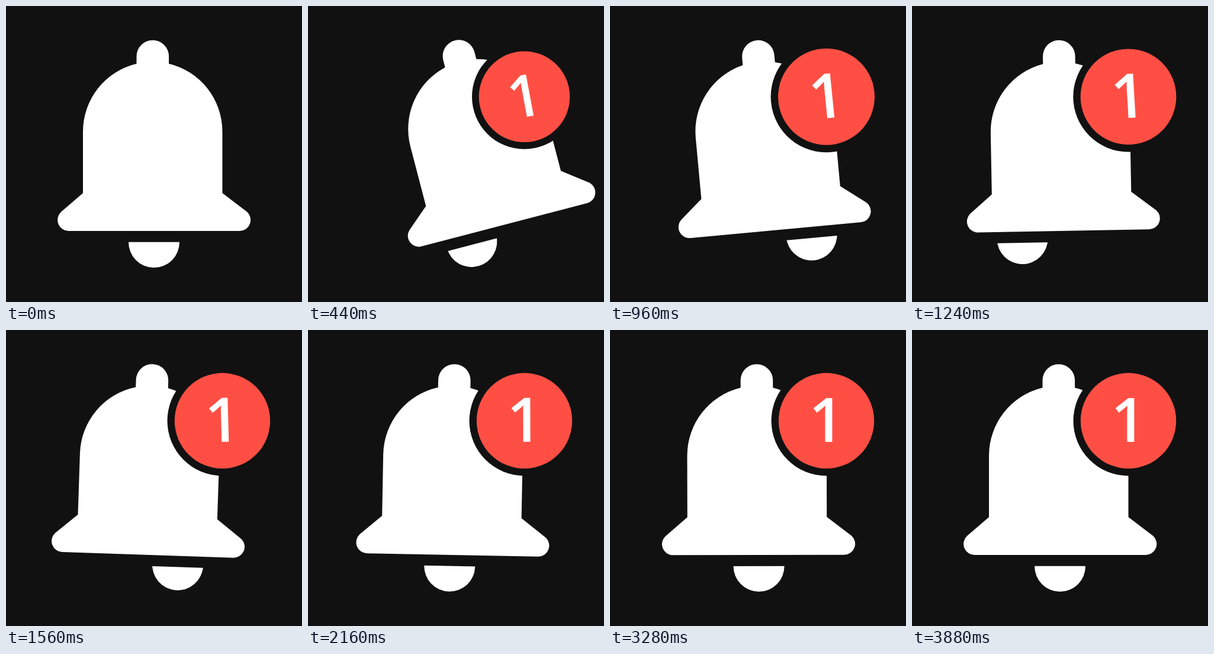
An HTML page that plays this animation: 500 by 500 pixels, repeating every 4.04 s.

```html
<!DOCTYPE html>
<html lang="en">
<head>
<meta charset="utf-8">
<title>Notification bell</title>
<style>
  html, body { margin: 0; width: 100%; height: 100%; overflow: hidden; background: #111; }
  svg { display: block; width: 100vw; height: 100vh; }
  text { font: 600 104px "Open Sans", "Noto Sans", sans-serif; text-anchor: middle; fill: #fff; }
</style>
</head>
<body>
<svg viewBox="0 0 500 500">
  <clipPath id="below"><rect x="0" y="398.8" width="500" height="150"/></clipPath>
  <g id="bell" fill="#fff">
    <path d="M220.5 97.5V85a27.3 27.3 0 0 1 54.6 0V97.5A118 118 0 0 1 365.5 212V316L407.5 348.1A18.5 18.5 0 0 1 394.8 380H105.5A18.5 18.5 0 0 1 92.8 348.1L130 316V212A118 118 0 0 1 220.5 97.5Z"/>
    <g clip-path="url(#below)">
      <circle id="clapper" cx="250" cy="399" r="43"/>
    </g>
  </g>
  <g id="badge">
    <circle r="93" fill="#111"/>
    <circle r="80.7" fill="#ff4f44"/>
    <text id="digit" y="35.7">1</text>
  </g>
</svg>
<script>
const LOOP = 4040, STEP = 40, END = 3880;
const HALF = 372;      // half a swing, in ms
const RELEASE = 332;   // the bell is pulled aside until here

const get = id => document.getElementById(id);
const bell = get("bell"), clapper = get("clapper"), badge = get("badge"), digit = get("digit");
const wave = (t, half) => Math.cos(Math.PI * t / half);
const turn = angle => `rotate(${angle} 250 57.5)`;

// Pull aside, then a damped pendulum.
function bellAngle(t) {
  if (t < RELEASE) return -29 * (1 - wave(t, RELEASE)) / 2;
  const s = t - RELEASE;
  return -29 * Math.pow(1.94, -s / HALF) * wave(s, HALF);
}

// Swings against the bell, gathers strength and fades out.
function clapperAngle(t) {
  const fade = Math.pow(1 - t / END, 1.5);
  return 21 * Math.min(1, t / 660) * fade * wave(t - 500, HALF);
}

// Pops out with a slight overshoot.
function badgeScale(t) {
  const s = Math.max(0, t - 50);
  return 1 - Math.exp(-s / 200) * wave(s, 1000);
}

const digitAngle = t => -12.5 * Math.exp(-((t / 1080) ** 2));

function draw(t) {
  const scale = badgeScale(t);
  bell.setAttribute("transform", turn(bellAngle(t)));
  clapper.setAttribute("transform", turn(clapperAngle(t)));
  badge.setAttribute("visibility", scale > 0 ? "visible" : "hidden");
  badge.setAttribute("transform", `translate(365.5 153.3) scale(${scale})`);
  digit.setAttribute("transform", `rotate(${digitAngle(t)})`);
}

const begin = performance.now();
function tick() {
  const t = (performance.now() - begin) % LOOP;
  draw(Math.min(Math.floor(t / STEP) * STEP, END));
  requestAnimationFrame(tick);
}
tick();
</script>
</body>
</html>
```
